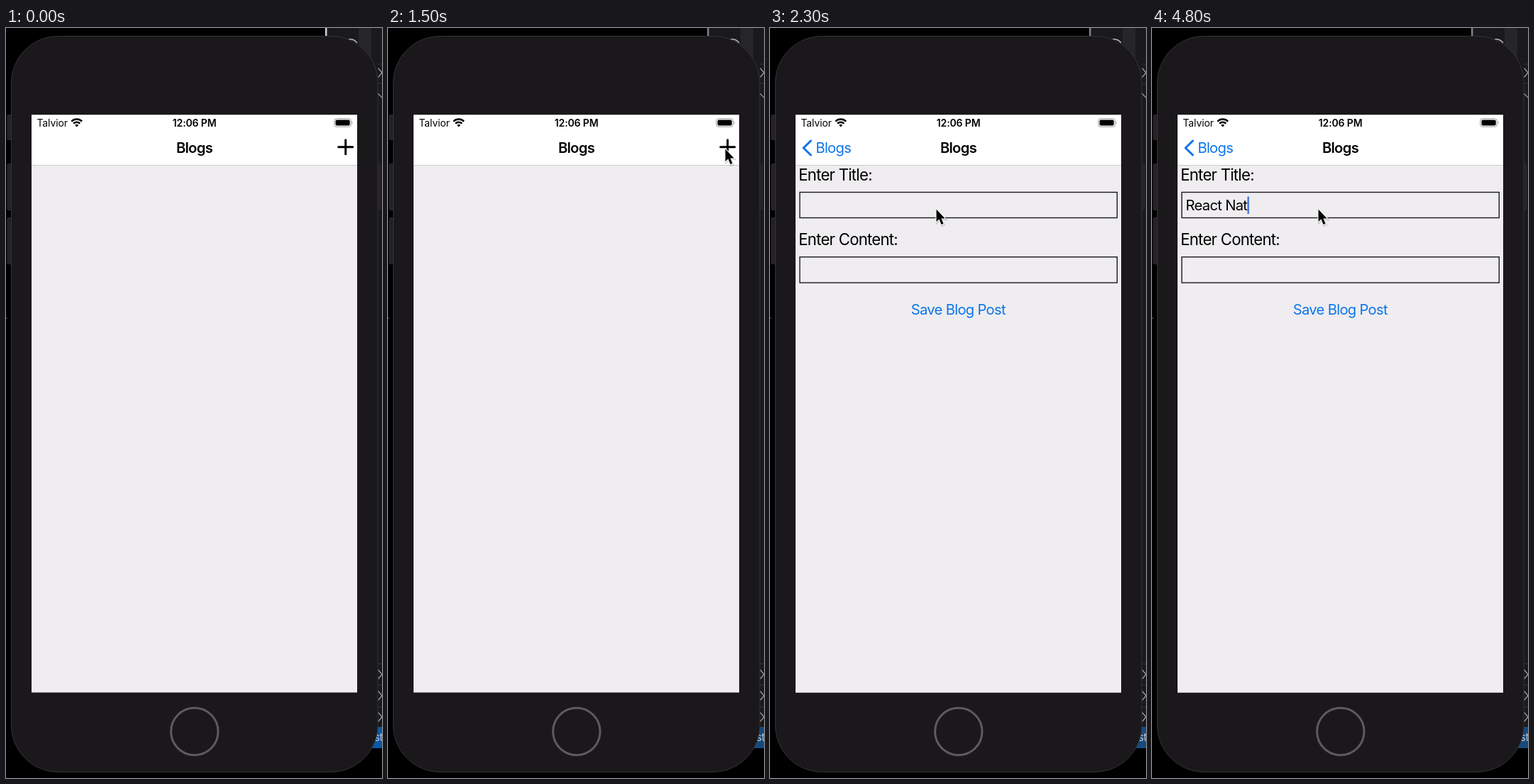
An HTML page for the animation above (5000 ms loop, 530 by 1057 pixels).

```html
<!DOCTYPE html>
<html lang="en">
<head>
<meta charset="utf-8">
<title>Blogs</title>
<style>
  html, body { margin: 0; width: 100%; height: 100%; overflow: hidden; background: #000; }
  svg { display: block; width: 100vw; height: 100vh; }
  text {
    font: 20.2px Inter, "Liberation Sans", sans-serif;
    font-optical-sizing: none;
    letter-spacing: -.034em;
    white-space: pre;
  }
  .status { font-size: 14px; letter-spacing: -.01em; }
  .bold { font-weight: 600; }
  .label { font-size: 22.2px; }
  .mid { text-anchor: middle; }
  .blue { fill: #0b75ea; }
  .box { fill: none; stroke: #1a1a1c; stroke-width: 1.4; }
  .round { fill: none; stroke-linecap: round; stroke-linejoin: round; }
</style>
</head>
<body>
<svg viewBox="0 0 530 1057" preserveAspectRatio="none">
  <defs>
    <linearGradient id="shade">
      <stop offset="0" stop-color="#000" stop-opacity="0"/>
      <stop offset="1" stop-color="#000" stop-opacity=".12"/>
    </linearGradient>
    <clipPath id="screen"><rect x="36" y="193" width="459" height="743.5"/></clipPath>
  </defs>

  <!-- desktop behind the phone -->
  <rect width="530" height="1057" fill="#000"/>
  <rect x="452" width="78" height="1015" fill="#1a191b"/>
  <rect x="497" width="18" height="60" fill="#262528"/>
  <path d="M524 51h6M524 78h6M524 896h6M524 926h6M524 957h6" stroke="#38363a"/>
  <path class="round" d="M525 57l10 12m0-12l-10 12M524 92l6 6M525 905l10 12m0-12l-10 12M525 935l10 12m0-12l-10 12M525 965l10 12m0-12l-10 12" stroke="#a3a1a4" stroke-width="1.2"/>
  <path d="M483 16q7-1 12 5" fill="none" stroke="#b8b8b8" stroke-width="1.5"/>
  <rect id="edge" x="450" width="2.4" height="12"/>
  <rect id="pick" x="505" y="985" width="25" height="30"/>
  <text x="519" y="1005" fill="#b9c6d3" style="font-size:15px">st</text>
  <rect y="408" width="2" height="2" fill="#333"/>

  <!-- phone -->
  <g fill="#232124" stroke="#2e2c2f">
    <rect x="2" y="122.5" width="8" height="35" rx="1.5"/>
    <rect x="2" y="191.5" width="8" height="65" rx="1.5"/>
    <rect x="2" y="267.5" width="8" height="65" rx="1.5"/>
    <rect x="520" y="191.5" width="7.5" height="65" rx="1.5"/>
    <rect x="7.5" y="11.5" width="516.5" height="1037" rx="66" fill="#1a181b" stroke="#353336"/>
  </g>
  <circle cx="265.8" cy="991.5" r="33.2" fill="none" stroke="#5d5b5e" stroke-width="3"/>
  <rect x="36" y="122.5" width="459" height="814" fill="#efedf0"/>

  <!-- form page -->
  <g clip-path="url(#screen)">
    <g id="page">
      <rect x="27" y="193" width="9" height="744" fill="url(#shade)"/>
      <rect x="36" y="193" width="459" height="744" fill="#efedf0"/>
      <text class="label" x="40.2" y="215">Enter Title:</text>
      <rect class="box" x="42" y="231.5" width="447.3" height="36"/>
      <text class="label" x="40.2" y="306.4">Enter Content:</text>
      <rect class="box" x="42" y="322.7" width="447.3" height="36.3"/>
      <text class="mid blue" x="265.3" y="404.4">Save Blog Post</text>
      <text id="typed" x="47.5" y="256.8"></text>
      <rect id="caret" y="237.5" width="2.3" height="24.5" fill="#4070d8"/>
    </g>
  </g>

  <!-- header -->
  <rect x="36" y="122.5" width="459" height="71" fill="#fff"/>
  <rect x="36" y="193" width="459" height="1" fill="#cbcacd"/>
  <text class="status" x="43.5" y="138.6">Talvior</text>
  <g class="round" stroke="#000" stroke-width="2.4" style="stroke-linecap:butt">
    <path d="M92.3 131.6a10.4 10.4 0 0 1 14.8 0M95.1 134.7a6.4 6.4 0 0 1 9.2 0"/>
    <path d="M99.7 139.4l-2.4-2.5a3.4 3.4 0 0 1 4.8 0z" fill="#000" stroke="none"/>
  </g>
  <text class="status bold mid" x="265.6" y="138.6">12:06 PM</text>
  <rect x="462.8" y="127.8" width="23.6" height="11.4" rx="3" fill="none" stroke="#9b9b9b"/>
  <rect x="464.5" y="129.4" width="20.2" height="8.2" rx="1.8"/>
  <path d="M487.8 131.5q2 2 0 4z" fill="#9b9b9b"/>
  <text id="title" class="bold mid" x="265.5" y="176">Blogs</text>
  <path id="plus" class="round" d="M478.7 157.8v20M468.7 167.8h20" stroke="#000" stroke-width="3"/>
  <g id="back">
    <path class="round" d="M57.5 159l-10.3 10 10.3 10" stroke="#0b75ea" stroke-width="3"/>
    <text class="blue" x="64.4" y="176">Blogs</text>
  </g>

  <g id="mouse">
    <path id="arrow" d="M0 0V17.5L4 14 7 21.5 10 20.3 7 13H12.2Z" fill="#000" opacity=".15" stroke="#000" stroke-width="3" transform="translate(.7 1.3)"/>
    <path d="M0 0V17.5L4 14 7 21.5 10 20.3 7 13H12.2Z" stroke="#fff" stroke-width="2.2" stroke-linejoin="round" paint-order="stroke"/>
  </g>
</svg>
<script>
const LOOP = 5000, STEP = 100, WIDTH = 459;
const TEXT = "React Nat";
const KEYS = [3100, 3300, 3400, 3500, 3700, 4000, 4500, 4600, 4800];
// time, x, y of the pointer tip
const PATH = [
  [600, 338, 496], [1100, 481, 197.5], [1200, 480, 195], [1400, 476, 171],
  [1600, 475, 170], [1700, 461, 171], [1900, 263, 249], [2000, 242, 253.5], [2200, 234.5, 255.5]
];
const el = id => document.getElementById(id);
const [page, typed, caret, title, plus, back, mouse, edge, pick] =
  ["page", "typed", "caret", "title", "plus", "back", "mouse", "edge", "pick"].map(el);

function pointer(t) {
  const i = PATH.findIndex(p => p[0] > t);
  if (i === 0) return PATH[0].slice(1);
  if (i < 0) return PATH[PATH.length - 1].slice(1);
  const [t0, x0, y0] = PATH[i - 1], [t1, x1, y1] = PATH[i];
  const u = (t - t0) / (t1 - t0), k = u * u * (3 - 2 * u);
  return [x0 + (x1 - x0) * k, y0 + (y1 - y0) * k];
}

// critically damped spring, from 1 down to 0
function spring(t) {
  const w = Math.max(0, t) * 0.0182;
  return (1 + w) * Math.exp(-w);
}

function draw(t) {
  const left = spring(t - 1500), done = 1 - left;
  page.setAttribute("transform", `translate(${left * WIDTH})`);
  page.style.display = t > 1500 ? "" : "none";
  back.style.opacity = done;
  title.style.opacity = 1 - done * left;
  plus.style.opacity = left * left * left > 0.001 ? left * left * (left > 0.2 ? 1 : 2.5) : 0;

  const active = t < 1300;
  edge.setAttribute("fill", active ? "#d6d6d6" : "#858585");
  pick.setAttribute("fill", active ? "#0a59a6" : "#174a7c");

  mouse.style.display = t < 500 ? "none" : "";
  mouse.setAttribute("transform", `translate(${pointer(t)})`);

  const count = KEYS.filter(k => k <= t).length;
  typed.textContent = TEXT.slice(0, count);
  caret.style.display = t < 2500 ? "none" : "";
  caret.setAttribute("x", 47.7 + (count ? typed.getComputedTextLength() : 0.6));
}

function frame(now) {
  draw(Math.floor(now % LOOP / STEP) * STEP);
  requestAnimationFrame(frame);
}
draw(0);
requestAnimationFrame(frame);
</script>
</body>
</html>
```
